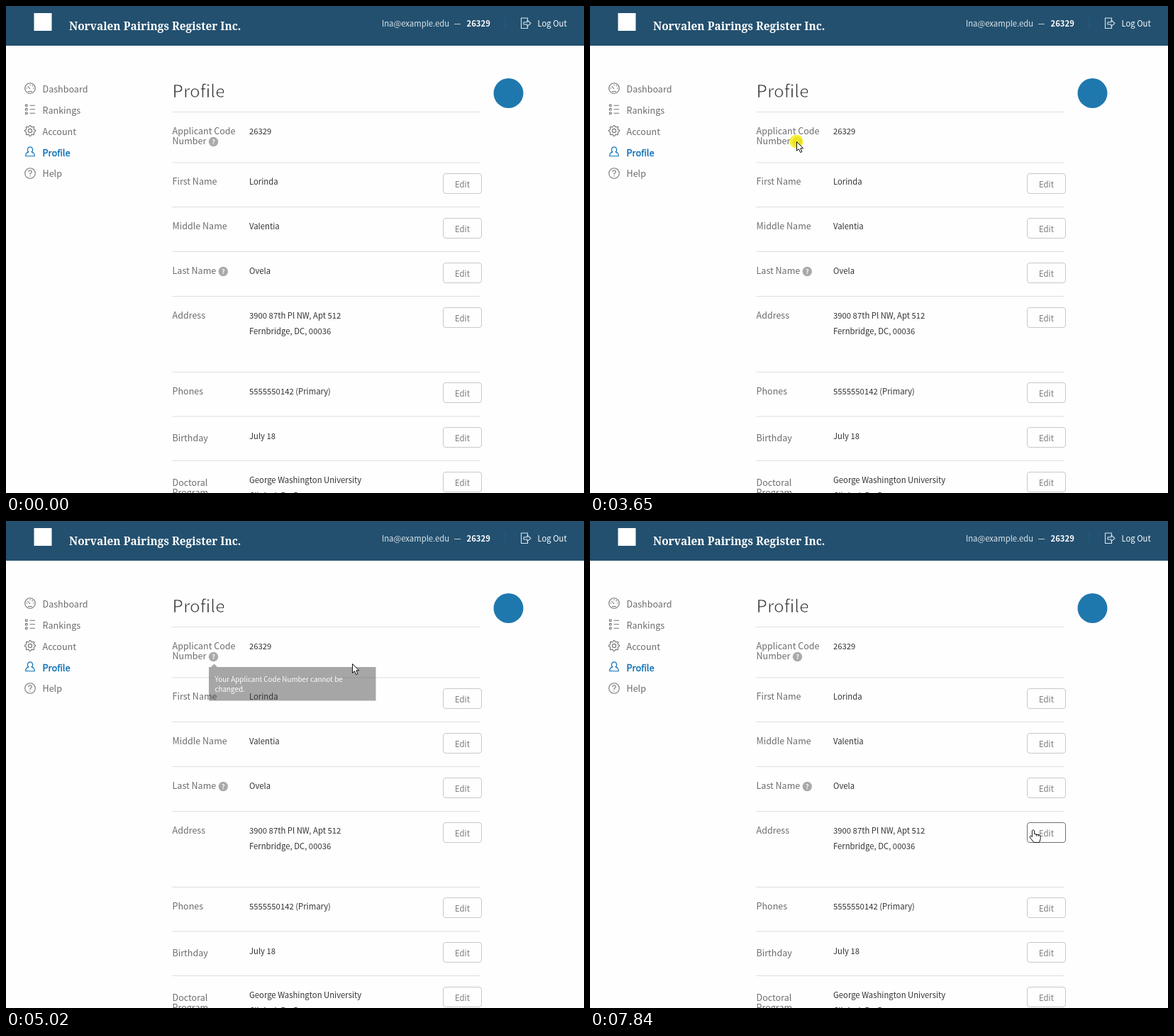
These frames come from a looping animation (815 px wide and 687 px high, 8000 ms). An HTML page:

```html
<!DOCTYPE html>
<html lang="en">
<head>
<meta charset="utf-8">
<title>Profile</title>
<style>
  html, body { margin: 0; width: 100%; height: 100%; overflow: hidden; background: #fefefe; }
  svg { display: block; width: 815px; height: 687px; }
  text { font: 11.3px "Noto Sans CJK JP", "Noto Sans CJK SC", "Noto Sans CJK KR", "Open Sans", sans-serif; fill: #333; white-space: pre; }
  .label { font-size: 12.55px; fill: #6c6c6c; }
  .active { font-size: 12.8px; fill: #0d70b8; stroke: #0d70b8; stroke-width: .4; }
  /* a background-coloured outline thins the strokes to a light weight */
  .title { font-size: 24.3px; fill: #333; stroke: #fefefe; stroke-width: .7; }
  .brand { font: bold 15.4px "Noto Serif", serif; fill: #fff; }
  .head { fill: #fff; }
  .soft { fill: #dbe5ec; }
  .bold { font-weight: bold; }
  .button { fill: #7a7a7a; text-anchor: middle; }
  .input { font-size: 10px; fill: #666; }
  .tip { font-size: 9.85px; font-weight: 500; fill: #fff; }
  .mark { font-size: 9px; font-weight: bold; fill: #fff; text-anchor: middle; }
  .icon { fill: none; stroke: #747474; stroke-width: 1.1; stroke-linejoin: round; }
  .box { fill: #fefefe; stroke: #c8c8c8; }
  .box.hover { stroke: #707070; }
  .rule { stroke: #dedede; }
  .cursor path { fill: #fff; stroke: #111; stroke-width: 1; stroke-linejoin: round; }
  .query { font-size: 11.5px; font-weight: bold; fill: #111; stroke: #fff; stroke-width: 1.4; paint-order: stroke; }
</style>
</head>
<body>
<svg id="stage" viewBox="0 0 815 687"></svg>
<script>
const LOOP = 8000;
const FIRST_NAME = 'Lorinda';
const stage = document.getElementById('stage');

const text = (x, y, s, cls = '') => `<text x="${x}" y="${y}" class="${cls}">${s}</text>`;
const icon = (d, extra = '') => `<path class="icon" d="${d}" ${extra}/>`;
const ring = (x, y, r) => `<circle class="icon" cx="${x}" cy="${y}" r="${r}"/>`;
const box = (x, y, w, h = 28, id = '') =>
  `<rect id="${id}" class="box" x="${x}" y="${y}" width="${w}" height="${h}" rx="3.5"/>`;
const badge = (x, y) =>
  `<circle cx="${x}" cy="${y}" r="6.7" fill="#aaa"/>` + text(x, y + 3.3, '?', 'mark');

function gear(cx, cy) {
  const points = [];
  for (let i = 0; i < 32; i++) {
    const r = i % 4 < 2 ? 7.5 : 5.8, a = (i - 0.5) * Math.PI / 16;
    points.push(`${(cx + r * Math.cos(a)).toFixed(2)} ${(cy + r * Math.sin(a)).toFixed(2)}`);
  }
  return icon(`M${points.join('L')}Z`) + ring(cx, cy, 2.6);
}

const header = `
  <rect width="815" height="56" fill="#23506f"/>
  <rect x="39.5" y="10" width="25" height="25" fill="#fff"/>
  ${text(89, 34, 'Norvalen Pairings Register Inc.', 'brand')}
  ${text(530, 29, 'lna@example.edu', 'soft')}
  ${text(631.5, 29, '—', 'head')}
  ${text(649.5, 29, '26329', 'head bold')}
  <path d="M704 16V32" stroke="#176096"/>
  ${icon('M735.5 19.5V17H726.5V31.5H735.5V29M730 22.7H735V20L740 24.3L735 28.6V26H730Z', 'style="stroke:#dbe5ec"')}
  ${text(749.5, 29, 'Log Out', 'head')}`;

const nav = `
  ${ring(34, 116, 7.3)}
  ${icon('M34 117L30.5 113M34 110.5v1.5M28.5 116h1.5M38 116h1.5M37.8 112l-1 1M31 120.5h6')}
  ${[140, 145.5, 151].map(y => icon(`M27.5 ${y - 1}h2.5v2.5h-2.5zM33.5 ${y + .2}H41`)).join('')}
  ${gear(34, 176)}
  ${icon('M34 198.8a3.7 3.9 0 0 1 2 7.1c3 .8 4.3 2.4 4.3 5.8H27.7c0-3.4 1.3-5 4.3-5.8a3.7 3.9 0 0 1 2-7.1z', 'style="stroke:#0d70b8"')}
  ${ring(34, 236, 7.3)}
  ${icon('M31.8 234.2q0-2.4 2.2-2.4t2.2 2.2q0 1.3-2.2 2.8v1.2M34 239.3v1.2')}
  ${['Dashboard', 'Rankings', 'Account', 'Profile', 'Help'].map((s, i) =>
    text(51.5, 121.8 + i * 29.9, s, s === 'Profile' ? 'active' : 'label')).join('')}`;

// Button rows: top of button, label, label baseline, value, value baseline
const rows = [
  [236.5, 'First Name', 252, '', 252],
  [299.5, 'Middle Name', 315, 'Valentia', 315],
  [362.5, 'Last Name', 378, 'Ovela', 378],
  [425.5, 'Address', 440.8, '3900 87th Pl NW, Apt 512', 440.8],
  [531.5, 'Phones', 547.6, '5555550142 (Primary)', 547.6],
  [594.5, 'Birthday', 614, 'July 18', 610.5],
  [657.5, 'Doctoral', 676.8, 'George Washington University', 673.2],
];

const editButton = (y, i) => box(616.5, y, 54, 28, 'edit' + i) + text(643.5, y + 19, 'Edit', 'button');

const page = `
  ${text(234.5, 128.7, 'Profile', 'title')}
  <circle cx="708.5" cy="123" r="21" fill="#1f78ad"/>
  ${[149.5, 221, 283.5, 346.5, 409.5, 516.5, 579, 641.5].map(y => `<path class="rule" d="M234.5 ${y}H669"/>`).join('')}
  ${text(234.5, 181, 'Applicant Code', 'label')}${text(234.5, 195, 'Number', 'label')}
  ${text(343, 181, '26329')}
  ${badge(292.5, 191.5)}${badge(306.3, 374.5)}
  ${rows.map(([top, label, labelY, value, valueY], i) =>
    text(234.5, labelY, label, 'label') + text(343, valueY, value) + (i ? editButton(top, i) : '')).join('')}
  ${text(343, 462.8, 'Fernbridge, DC, 00036')}
  ${text(234.5, 690.5, 'Program', 'label')}${text(343, 695, 'Clinical, PsyD')}
  <g id="view">${text(343, 252, FIRST_NAME)}${editButton(236.5, 0)}</g>
  <g id="form">
    ${box(355, 236.5, 166, 26.5)}${text(361, 253.8, FIRST_NAME, 'input')}
    ${box(545, 236.5, 125.5)}${text(573.5, 255.5, 'Save', 'button')}
    <path class="box hover" d="M602.5 236.5H667a3.5 3.5 0 0 1 3.5 3.5V261a3.5 3.5 0 0 1-3.5 3.5H602.5Z"/>
    ${text(636, 255.5, 'Cancel', 'button')}
  </g>
  <g id="tooltip">
    <path fill="#333" d="M286 206H289L293.5 201.5L298 206H521.5V253.5H286Z"/>
    ${text(294.5, 227, 'Your Applicant Code Number cannot be', 'tip')}
    ${text(294.5, 241, 'changed.', 'tip')}
  </g>`;

const cursor = `
  <g id="cursor" class="cursor">
    <circle id="click" r="9.5" fill="#f6ec10" opacity=".85"/>
    <g id="arrow"><path d="M.5 .5V13.3L3.4 10.7L5.6 15.6L7.9 14.6L5.8 9.8H9.7Z"/></g>
    <text id="help" class="query" x="10.5" y="17.5">?</text>
    <g id="hand"><path d="M-1.6 1.3Q0-1 1.6 1.3V6L8 7.2Q10.3 7.8 10.2 10V13L8.5 18H1L-4.3 11.5Q-5.6 9.3-3.6 8.6L-1.6 10ZM4.4 6.5V9M7.2 7V9.4"/></g>
  </g>`;

stage.innerHTML = header + nav + page + cursor;
const el = Object.fromEntries([...stage.querySelectorAll('[id]')].filter(e => e.id).map(e => [e.id, e]));

// Pointer moves in discrete steps along a quadratic curve
const START = [733, 627];
const moves = [
  { from: 580, to: 730, steps: 3, end: [508, 66] },
  { from: 900, to: 1390, steps: 7, end: [279, 196] },
  { from: 1560, to: 1640, steps: 2, end: [290, 188] },
  { from: 2540, to: 2610, steps: 2, end: [291, 190] },
  { from: 3350, to: 3350, steps: 1, end: [291, 191] },
  { from: 4780, to: 5420, steps: 9, end: [761, 242], bend: [502, 191] },
  { from: 5670, to: 6270, steps: 8, end: [644.5, 250.5], bend: [708, 259] },
  { from: 7320, to: 7840, steps: 8, end: [625, 435.5] },
];
const clicks = [[3650, 3820], [6440, 6510], [6830, 6990]];

const within = (t, [a, b]) => t >= a && t < b;
const clamp = v => Math.max(0, Math.min(1, v));
const hold = (t, start, step) => start + Math.floor((t - start) / step) * step;
const show = (e, on) => e.setAttribute('visibility', on ? 'visible' : 'hidden');

function pointerAt(t) {
  let p = START;
  for (const { from, to, steps, end, bend } of moves) {
    if (t < from) break;
    const interval = (to - from) / (steps - 1 || 1) || 1;
    const u = Math.min(steps, Math.floor((t - from) / interval + 1e-6) + 1) / steps;
    p = p.map((a, i) => {
      const c = bend ? bend[i] : (a + end[i]) / 2;
      return (1 - u) ** 2 * a + 2 * u * (1 - u) * c + u * u * end[i];
    });
  }
  return p;
}

function tooltipOpacity(t) {
  if (t < 3990) return 0;
  return t < 4780 ? clamp((hold(t, 3990, 76) - 3969) / 240)
                  : clamp((5110 - hold(t, 4780, 80)) / 210);
}

function draw(t) {
  const [x, y] = pointerAt(t);
  const present = t >= 500;
  const editing = within(t, [6510, 7070]);
  const helping = within(t, [3740, 4780]);
  let over = editing;

  rows.forEach(([top], i) => {
    const hit = present && x >= 616 && x <= 671 && y >= top && y <= top + 28;
    el['edit' + i].classList.toggle('hover', hit);
    over = over || hit;
  });

  el.view.style.display = editing ? 'none' : '';
  el.form.style.display = editing ? '' : 'none';
  el.tooltip.setAttribute('opacity', tooltipOpacity(t));
  el.cursor.setAttribute('transform', `translate(${x} ${y})`);
  show(el.arrow, present && !over);
  show(el.hand, present && over);
  show(el.help, helping);
  show(el.click, clicks.some(c => within(t, c)));
}

function tick() {
  draw(performance.now() % LOOP);
  requestAnimationFrame(tick);
}
tick();
</script>
</body>
</html>
```
